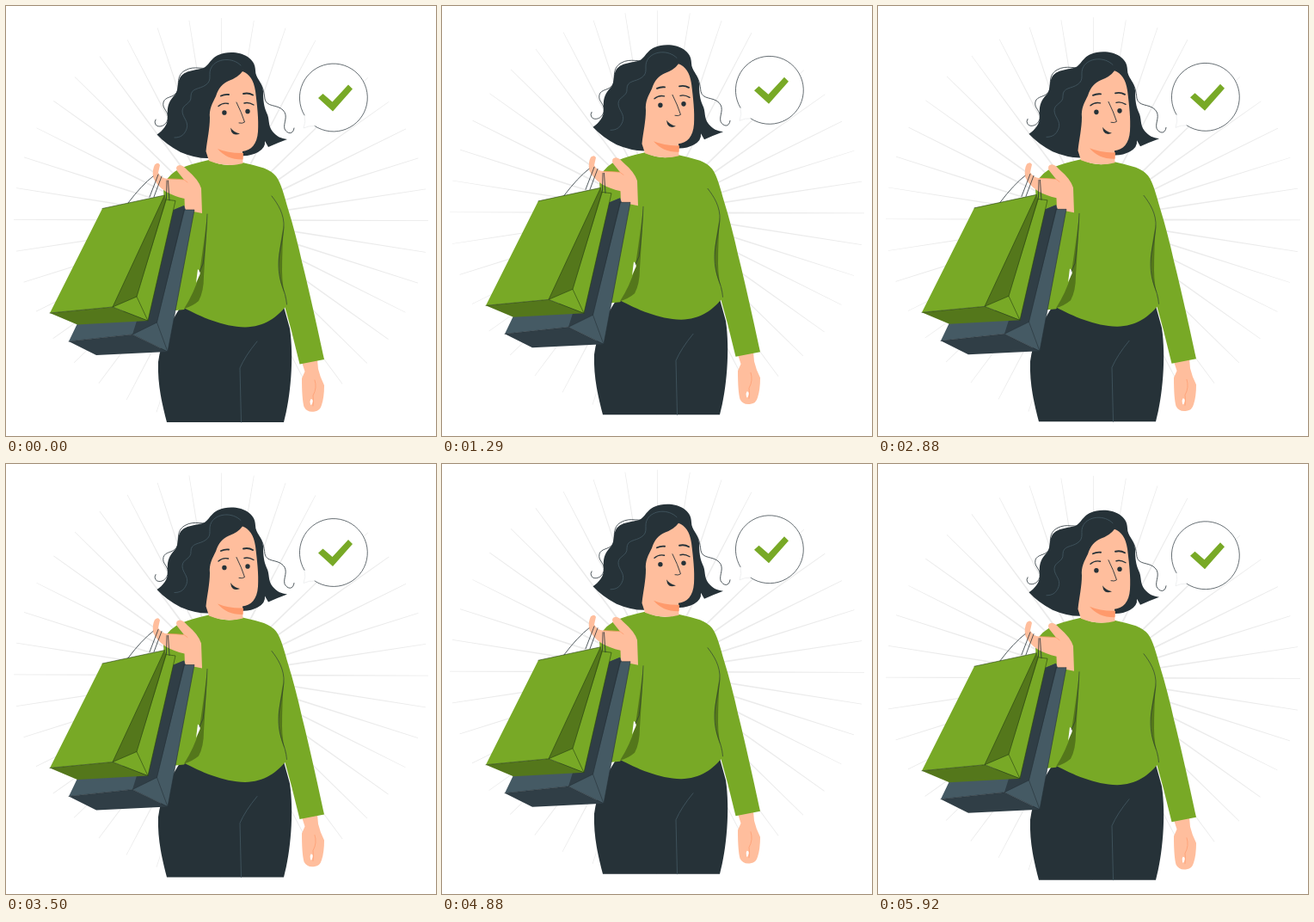
Animation of 500x500 px, one loop 5.96 s. Source, as an HTML page with a canvas:

```html
<!DOCTYPE html>
<html lang="en">
<head>
<meta charset="utf-8">
<title>Happy shopper</title>
<style>
html, body { margin: 0; width: 100%; height: 100%; overflow: hidden; background: #fff; }
canvas { display: block; width: 500px; height: 500px; }
</style>
</head>
<body>
<canvas id="stage"></canvas>
<script>
const canvas = document.getElementById('stage');
const ctx = canvas.getContext('2d');
const dpr = window.devicePixelRatio || 1;
canvas.width = canvas.height = 500 * dpr;

const PERIOD = 2980, LIFT = 10;
const DARK = '#263238', SLATE = '#455a64', SHADE = '#303e46';
const GREEN = '#78a926', MOSS = '#54771b', SKIN = '#ffbe9d', BLUSH = '#ff9a6c';

const art = [];
const fill = (color, d) => art.push({ color, path: new Path2D(d) });
const line = (color, width, d) => art.push({ color, width, path: new Path2D(d) });

// Speech bubble
fill('#fff', 'M381 67.5A39.5 39.5 0 1 1 361 141L358 139Q352 139 346 142Q349 135 348 128.500A39.5 39.5 0 0 1 381 67.5Z');
line(DARK, 0.7, 'M347 127A39.5 39.5 0 1 1 359 139.500');
line('#e4e6e7', 0.6, 'M347 127Q349 135 346 142Q352 139 359 139.500');
fill(GREEN, 'M363 107L368.500 102L379.500 111.500L398 91.500L403 96.500L380 122.500Z');

// Hair
fill(DARK, `M262 54C276 54 290 61 290 75C290 84 298 88 299 99C299 110 300 117 303 124
  C307 131 304 139 310 146C315 152 320 154 327 155Q316 159 305 164L301 157Q302 165 293 170
  Q284 175 272 174L238 177Q222 178 203 170Q186 161 175.500 149.500C182 145 189 138 188 128
  C187 118 189 112 194 106C202 99 198 92 202 84C207 74 222 75 230 72C239 67 238 55 262 54Z`);
line(DARK, 0.8, `M240 70C230 76 220 68 208 75C196 82 203 95 198 101C194 107 185 105 183 112
  C181 120 190 122 188 132C186 140 177 142 174 138Q172 135 174 132`);
line(DARK, 0.8, `M291 85C299 91 300 100 301 108C303 118 315 114 322 121C329 128 322 136 324 143
  C327 149 334 150 335 142`);
line(SLATE, 0.8, `M273 69C263 59 245 61 239 71C234 79 241 86 232 92C225 97 215 95 215 105
  C216 114 205 114 205 122C205 130 213 134 210 143C207 151 202 153 196 153`);

// Trousers
fill(DARK, `M203 350C190 370 180 391 177 414C176 441 182 465 187 484L323 484
  C331 455 335 409 330 375L322 346L265 362Z`);
line(SLATE, 0.8, 'M292 390Q278 407 272 421L273.500 484');

// Hand at her side
fill(SKIN, `M344 414L362 411L363 422Q365 431 370 441Q370 455 367 464Q365 471 359 471.500
  Q350 473 346.500 466Q344 457 344 433L347.500 425Z`);
fill('#fff', 'M354.500 457Q357.500 457 356.500 461Q355 466 354 463Q353 459 354.500 457Z');
line(BLUSH, 0.7, 'M359 435Q362 444 357 453Q358 460 357 465');

// Sweater
fill(GREEN, `M236 179Q214 184 205 188Q190 194 183 208L184 240L208 255L222 300
  L222 320L207 351C226 361 252 373 278 373.500C300 373 316 362 326.500 347.500L324 349
  L332 378L341.500 416.500L370 411C363 378 350 320 344 297C339 275 334 255 328 236
  C324 222 320 206 314 198Q309 192 300 188.500Q289 185 275 182Q256 189 236 179Z`);
fill(MOSS, `M323 254Q318 280 317 295Q317 315 321 327Q325 336 326.500 347
  Q321 325 321 308Q321 285 323 254Z`);
line(DARK, 0.6, `M309 221C316 230 324 242 323 258C321 277 317 286 317 300
  C317 324 325 328 326.500 347`);

// Bent sleeve
fill(GREEN, 'M205 236L234 242C233 266 231 291 226 310C222 329 215 345 207 353L197 354L190 330Z');
fill(MOSS, `M234 244Q230 276 226 303L224 315Q219 333 207 352
  Q217 349 224 343Q230 332 230 314Q232 285 234 244Z`);
fill('#fff', 'M223 306Q226.500 309 225.500 312L221 322Z');
line(DARK, 0.6, 'M234 242C233 266 231 286 229 300L225 309');

// Neck and face
fill(SKIN, `M275 76C283 79 288 86 290 99C292 115 294 132 293 146C292 161 285 168 275 169
  L275.500 183Q256 188 236 180L232.500 169C234 155 237 143 237 130C236 120 240 113 244 105
  C247 95 252 90 259 87Q270 83 275 76Z`);
fill(BLUSH, 'M246 166Q259 171.500 276 171L275.500 178.500Q257 179 246 166Z');
fill(DARK, 'M256.600 124A2.700 2.800 0 1 1 251.200 124A2.700 2.800 0 1 1 256.600 124Z');
fill(DARK, 'M283.700 122.500A2.700 2.800 0 1 1 278.300 122.500A2.700 2.800 0 1 1 283.700 122.500Z');
line(DARK, 1.9, 'M250 104.500Q254 102.500 259 103');
line(DARK, 1.9, 'M276 102Q282 100.500 287 103.500');
line(DARK, 1.4, 'M247 116.500Q252 112 258.500 113.500');
line(DARK, 1.4, 'M277 113Q282 111.500 288 115');
line(DARK, 0.9, 'M268 112Q274 124 277.500 135Q275 137 271 136');
fill(DARK, 'M261 141.500Q265 147 272 148.500Q265 151.500 262 146Z');

// Raised hand
fill(SKIN, `M173 184.500Q177 181 179 185L177 194Q180 200 188 201L207 202L199 192
  Q196 186 202 185Q206 185 211 191Q224 202 227 212L228 241L208 237L207.500 224
  Q195 221 186 216Q174 208 171 199Q170 190 173 184.500Z`);
line(BLUSH, 0.7, 'M188 201Q199 201 207 202L211 205');

// Slate bag
fill(SLATE, 'M190 239L207 232L209 237L219 237L188 402L147 382L73 390L85 365L160 350Z');
fill(SHADE, 'M190 239L207 232L208 237L175.500 368L147 382L153 363Z');
fill(SHADE, 'M73 390L147 382L188 402L105 406Z');
line(DARK, 0.6, 'M207 237L219 237L188 402L147 382L73 390M207 237L175.500 368L147 382M175.500 368L188 402');

// Green bag
fill(GREEN, 'M112 235.500L184.500 220L197 226.500L165 366L124 350L51 357Z');
fill(MOSS, 'M184.500 220L186.500 226L152 338L124 350Z');
fill(MOSS, 'M51 357L124 350L165 366L83 370.500Z');
line('#263f12', 0.6, 'M112 235.500L184.500 220L124 350L51 357M186 225L197 226.500L165 366L124 350L152 338L186 225M152 338L165 366');

// Handles
line(DARK, 0.8, 'M142 229Q158 208 171 198M167 222L177 196M172 222L181 198M187 203L186.500 224M188.500 203L190 226');

function rays() {
  ctx.fillStyle = '#ebebeb';
  for (let i = 0; i < 40; i++) {
    if (i === 4) continue; // open space above the bubble
    const a = i * Math.PI / 20 + 0.0025, s = Math.sin(a), c = -Math.cos(a);
    const at = (r, w) => [250 + 241 * r * s + w * c, 249 + 235 * r * c - w * s];
    ctx.beginPath();
    ctx.moveTo(...at(0.3, 0.9));
    ctx.lineTo(...at(1, 0.35));
    ctx.lineTo(...at(1, -0.35));
    ctx.lineTo(...at(0.3, -0.9));
    ctx.fill();
  }
}

function draw(ms) {
  const p = (ms % PERIOD) / PERIOD;
  const rise = LIFT * (1 - Math.abs(2 * p - 1));
  ctx.setTransform(dpr, 0, 0, dpr, 0, 0);
  ctx.fillStyle = '#fff';
  ctx.fillRect(0, 0, 500, 500);
  ctx.translate(0, -rise);
  ctx.lineCap = ctx.lineJoin = 'round';
  rays();
  for (const { color, width, path } of art) {
    if (width) {
      ctx.strokeStyle = color;
      ctx.lineWidth = width;
      ctx.stroke(path);
    } else {
      ctx.fillStyle = color;
      ctx.fill(path);
    }
  }
}

const start = performance.now();
function tick() {
  draw(performance.now() - start);
  requestAnimationFrame(tick);
}
tick();
</script>
</body>
</html>
```
